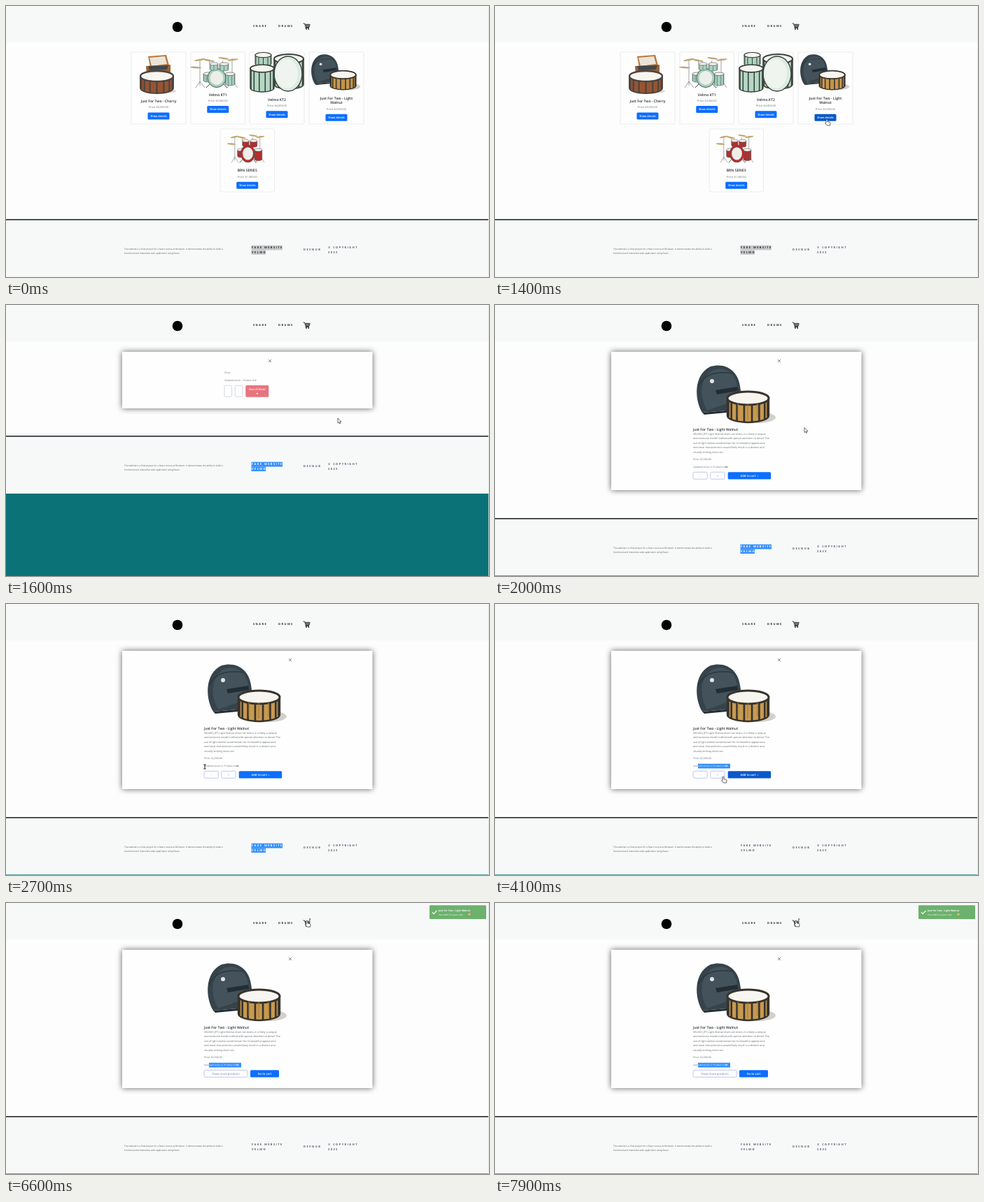
These frames come from a looping animation (690x388 px, 8000 ms). An HTML page:

```html
<!DOCTYPE html>
<html lang="en">
<head>
<meta charset="utf-8">
<title>Drum shop</title>
<style>
  html, body { margin: 0; width: 100%; height: 100%; overflow: hidden; background: #fdfdfd; }
  svg { display: block; width: 100vw; height: 100vh; }
  text { font-family: "Open Sans", "Noto Sans", sans-serif; text-rendering: geometricPrecision; white-space: pre; }
  .panel { fill: #fefefe; filter: drop-shadow(0 0 4px rgba(0, 0, 0, .62)); }
</style>
</head>
<body>
<svg id="stage" viewBox="0 0 690 388" preserveAspectRatio="none"></svg>
<script>
const LOOP = 8000, STEP = 100;
const BLUE = '#0d6efd', BLUE_DARK = '#0a58ca', SELECT = '#3390ff', INK = '#25292d', GREY = '#666b70';
const BRAND = 'Velmo', SERIES = 'Just For Two', ITEM = `${SERIES} - Light Walnut`;

// y is the vertical middle of the capitals
const text = (x, y, size, str, o = {}) =>
  `<text x="${x}" y="${y + size * .36}" font-size="${size}" fill="${o.fill || INK}" font-weight="${o.weight || 400}"
    text-anchor="${o.anchor || 'start'}" letter-spacing="${o.gap || 0}" ${o.attr || ''}>${str}</text>`;
const mid = (x, y, size, str, o = {}) => text(x, y, size, str, { ...o, anchor: 'middle' });
const spaced = (x, y, str, fill = INK) => text(x, y, 4, str, { weight: 700, gap: 1.42, fill });
const rect = (x, y, w, h, fill, attr = '') =>
  `<rect x="${x}" y="${y}" width="${w}" height="${h}" fill="${fill}" ${attr}/>`;
const oval = (x, y, rx, ry, fill, attr = '') =>
  `<ellipse cx="${x}" cy="${y}" rx="${rx}" ry="${ry}" fill="${fill}" ${attr}/>`;
const path = (d, fill, attr = '') => `<path d="${d}" fill="${fill}" ${attr}/>`;
const line = (d, color, w) => path(d, 'none', `stroke="${color}" stroke-width="${w}"`);
const group = (id, body, attr = '') => `<g id="${id}" ${attr}>${body}</g>`;
const button = (x, y, w, h, label, size, id = '') =>
  rect(x, y, w, h, BLUE, `rx="1.5" ${id && `id="${id}"`}`) + mid(x + w / 2, y + h / 2, size, label, { fill: '#fff', weight: 600 });
const outline = (x, y, w, h, label) =>
  rect(x, y, w, h, '#fefefe', 'rx="1.5" stroke="#a4b0ea" stroke-width=".7"') +
  mid(x + w / 2, y + h / 2, 4.1, label, { fill: '#7078c4' });

// Drum seen slightly from above, (x, y) is its top left corner
function drum(x, y, w, h, shell, rim = '#33302d', lugs = 5) {
  const r = w / 2, ry = w * .16, cx = x + r;
  let s = path(`M${x} ${y + ry}V${y + h - ry}A${r} ${ry} 0 0 0 ${x + w} ${y + h - ry}V${y + ry}Z`, shell, `stroke="${rim}" stroke-width="${w * .04}"`);
  for (let i = 0; i < lugs; i++) {
    const a = Math.PI * (i + .5) / lugs;
    const lx = cx - r * .97 * Math.cos(a), ly = y + ry + ry * Math.sin(a);
    s += line(`M${lx} ${ly}V${ly + h - 2 * ry}`, rim, w * .045);
  }
  return s + oval(cx, y + ry, r, ry, '#f6f5f0', `stroke="${rim}" stroke-width="${w * .05}"`);
}

// Case and snare in a 113 x 84 box
const caseAndSnare =
  oval(86, 75, 27, 8, '#d2d0cc') +
  path('M8 68C-3 50-5 14 20 2C40-4 59 7 62 30L65 50L54 64Z', '#36434b') +
  path('M15 65C4 46 3 19 24 7C41 1 55 11 58 31L60 49Z', '#43525b') +
  line('M2 31C10 14 25 8 52 12', '#28343b', 1.2) +
  path('M27 36L58 31L59 37L29 42Z', '#222d34') +
  path('M8 68L54 64L54 67L11 71Z', '#242e34') +
  oval(22, 23, 3, 3, '#dfe4e6') +
  drum(44, 38, 59, 44, '#c79a50', '#38332c', 8) +
  line('M59 54V75M73 56V78M87 54V75', '#a67732', 1);

const boxAndSnare =
  oval(226, 122, 17, 3, '#dddad5') +
  path('M203 72L229 70L233 85L206 88Z', '#b8793d') +
  path('M205 74L227 72L230 83L208 86Z', '#e9e4d9') +
  path('M200 86L235 84V98L201 100Z', '#9b6232') +
  path('M203 86L232 85L230 91L205 92Z', '#43464a') +
  drum(192, 93, 47, 32, '#965532', '#4c4340', 7);

// Kit in a 68 x 48 box
const kit = (shell, cymbal) =>
  line('M10 6V44M10 38L4 47M10 38L17 47M56 5V43M56 36L49 47M56 36L64 47M23 8L28 29M43 8L38 29', '#77797b', .7) +
  [[10, 7, -.5], [23, 8, .5], [44, 5, .4], [57, 7, -.4], [4, 18, .2]].map(([x, y, k]) =>
    oval(x, y, 8, 1.3, cymbal, `transform="rotate(${k * 20} ${x} ${y})"`)).join('') +
  drum(15, 25, 13, 14, shell, '#555', 4) + drum(46, 25, 14, 19, shell, '#555', 4) +
  oval(34, 33, 13, 13.5, shell, 'stroke="#555" stroke-width="1"') +
  oval(34, 33, 9.5, 10, '#eeeee9') +
  drum(24, 11, 12, 11, shell, '#555', 3) + drum(38, 11, 13, 12, shell, '#555', 3) +
  line('M24 42L19 47M44 42L49 47', '#444', 1);

const shells =
  drum(383, 69, 42, 50, '#b9d8c4', '#3c4441', 6) +
  oval(403, 97, 20, 25, '#dcece2', 'stroke="#39413e" stroke-width="1.4"') +
  oval(401, 97, 16, 21, '#eff4ef') +
  drum(356, 66.5, 23, 20, '#aed3bd', '#363d3a', 5) +
  drum(349, 84, 34, 39, '#b4d8c2', '#363d3a', 6);

function card(x, y, w, h, photo, title, titleY, price, btnY) {
  const cx = x + w / 2;
  const rows = [].concat(title);
  return rect(x, y, w, h, '#fefefe', 'rx="2" stroke="#e6e7e8" stroke-width=".8"') + photo +
    rows.map((row, i) => mid(cx, titleY + i * 6.5, 5.1, row, { weight: 600 })).join('') +
    mid(cx, btnY - 7.5, 3.8, `Price: ${price}`, { fill: GREY }) +
    button(cx - 15.5, btnY, 31, 10, 'Show details', 3.9, y === 66 && x === 433 ? 'details' : '');
}

const home =
  card(179, 66, 78, 103, boxAndSnare, `${SERIES} - Cherry`, 136.5, '$3,500.00', 152.5) +
  card(264, 66, 77.5, 103, `<g transform="translate(267 70)">${kit('#a5d2c0', '#bda777')}</g>`, `${BRAND} KT1`, 127, '$3,000.00', 143) +
  card(348, 66, 78, 103, shells, `${BRAND} KT2`, 134.5, '$4,000.00', 150.3) +
  card(433, 66, 78, 103, `<g transform="translate(436 69) scale(.62)">${caseAndSnare}</g>`, [`${SERIES} - Light`, 'Walnut'], 132, '$2,500.00', 154.8) +
  card(306, 176, 77.5, 90, `<g transform="translate(319 181) scale(.78 .92)">${kit('#bb2c2c', '#c2a568')}</g>`, 'BRN SERIES', 235.5, '$1,900.00', 251.8);

const header = rect(0, 0, 690, 52.5, '#f7f9f9') +
  oval(245, 30, 7.3, 7.3, '#000') +
  spaced(353, 29, 'SNARE') + spaced(389, 29, 'DRUMS') +
  line('M424.5 25H426.5L428.3 30.5H433L434.2 26.3H427M428.3 30.5L427.8 31.6H433', '#222', .9) +
  line('M427.5 27.8H433.8M427.9 29.1H433.4M429.3 26.5V30M431.7 26.5V30', '#222', .7) +
  oval(429, 33, .9, .9, '#222') + oval(432.3, 33, .9, .9, '#222') +
  group('badge', text(432.8, 23, 4.2, '2', { weight: 700 }));

const footer = rect(0, 305, 690, 83, '#f7f9f9') + rect(0, 305, 689, 1.7, '#303438') +
  text(169, 348.2, 3.15, 'The website is a final project for a React course at Brixlearn. It demonstrates the ability to build a', { fill: '#4d5256' }) +
  text(169, 354.2, 3.15, 'functional and interactive web application using React.', { fill: '#4d5256' }) +
  group('mark', rect(350.5, 342.7, 44.5, 6.8, 'inherit') + rect(350.5, 349.5, 20.5, 6.5, 'inherit')) +
  group('site', spaced(351, 345.9, 'FAKE WEBSITE', 'inherit') + spaced(351, 352.4, BRAND.toUpperCase(), 'inherit')) +
  spaced(425, 348.8, 'DEVNUB', '#565a6c') +
  spaced(460, 345.9, '© COPYRIGHT', '#565a6c') + spaced(460, 352.4, '2023', '#565a6c');

const cross = (x, y) => line(`M${x - 2} ${y - 2}l4 4m0-4l-4 4`, '#555', .7);

const loading = rect(166, 67, 357.5, 81, '#fefefe', 'class="panel"') + cross(377, 80) +
  text(312, 97, 3.5, 'Price:', { fill: GREY }) +
  text(312, 108, 3.4, 'Updated stock: . Product id #', { fill: GREY }) +
  rect(312, 115.3, 10.5, 16, '#fefefe', 'rx="1.5" stroke="#c3c9dd" stroke-width=".7"') +
  rect(327.3, 115.3, 10.5, 16, '#fefefe', 'rx="1.5" stroke="#c3c9dd" stroke-width=".7"') +
  mid(332.5, 123.5, 3.5, '-', { fill: '#99a' }) +
  rect(342.3, 115, 33, 16.8, '#e8747d', 'rx="1.5"') +
  mid(358.8, 120.6, 4, 'Out of Stock', { fill: '#fff', weight: 600 }) + oval(358.8, 127, 1, 1, '#fff');

const about = [
  'VELMO (JFT) Light Walnut drum set exists, it is likely a unique',
  'and exclusive model crafted with special attention to detail. The',
  'use of light walnut wood known for its beautiful appearance',
  'and tonal characteristics would likely result in a distinct and',
  'visually striking drum set.'
];
const stock = (fill, attr) =>
  text(283, 232.1, 3.4, 'Updated stock: 4. Product id <tspan font-weight="700">#4</tspan>', { fill, attr });

const detail = rect(166, 67, 357.5, 198, '#fefefe', 'class="panel"') + cross(406, 80) +
  `<g transform="translate(288 86)">${caseAndSnare}</g>` +
  text(283, 177.7, 5, ITEM, { weight: 600 }) +
  about.map((row, i) => text(283, 184.2 + i * 6.6, 3.7, row, { fill: GREY })).join('') +
  text(283, 221, 3.5, 'Price: $2,500.00', { fill: GREY }) +
  stock(GREY) + rect(290, 228.7, 0, 6.7, SELECT, 'id="select"') + stock('#fff', 'clip-path="url(#selected)"') +
  group('buy', outline(283, 239.3, 20.3, 10, '-') + outline(307.8, 239.3, 20.3, 10, '+') +
    button(332.7, 239.2, 61.5, 10.2, 'Add to cart  ›', 4.2, 'add')) +
  group('done', outline(283, 239.3, 62, 10, 'Show more products') +
    button(349, 239.2, 41, 10.2, 'Go to cart', 4.2, 'go'));

const toast = rect(605, 3.3, 81, 19.7, '#51a351', 'rx="1.2"') +
  line('M608.8 13.2l2.3 2.4l4.4-4.8', '#fff', 1.2) +
  text(618, 10.3, 3.4, ITEM, { fill: '#fff', weight: 700 }) +
  text(618, 16.3, 3.4, 'You add 2 in your cart.', { fill: '#fff' }) +
  path('M660 18l1.4-4l2.8 2.8Z', '#f2b04a') + oval(663.6, 14.3, .7, .7, '#dd5b60');

const pointers =
  path('M0 0V7.2L1.7 5.7L2.7 8L3.9 7.5L2.9 5.2H5Z', '#fff', 'id="arrow" stroke="#333" stroke-width=".7"') +
  group('beam', line('M-1.7-3H1.7M0-3V3M-1.7 3H1.7', '#222', 1)) +
  path('M0 0Q1 0 1 1V3.7L4.3 4.4Q5.3 4.8 5 6L4.5 9H.4L-2.2 5.9Q-2.5 4.8-1 5.2V1Q-1 0 0 0Z', '#fff', 'id="hand" stroke="#222" stroke-width=".7"');

const stage = document.getElementById('stage');
stage.innerHTML =
  '<defs><clipPath id="selected"><rect id="clip" x="290" y="228" width="0" height="8"/></clipPath></defs>' +
  rect(0, 0, 690, 388, '#fdfdfd') + header + group('home', home) +
  rect(0, 269.7, 690, 119, '#0b7377', 'id="teal"') + group('footer', footer) +
  group('loading', loading) + group('detail', detail) +
  rect(0, 387.2, 690, .8, '#3b8d91', 'id="edge"') + rect(689.2, 0, .8, 388, '#dfe2e3') +
  group('toast', toast) + group('cursor', pointers) +
  rect(0, 0, 690, 388, '#000', 'id="black"');

const el = {};
stage.querySelectorAll('[id]').forEach(node => el[node.id] = node);
const show = (id, on) => el[id].setAttribute('display', on ? 'inline' : 'none');
const set = (id, name, value) => el[id].setAttribute(name, value);

// time, x, y
const route = [
  [1400, 474, 162], [1800, 474, 162], [2300, 383, 200], [2650, 284, 233], [2700, 284, 233],
  [2800, 290, 233], [3100, 337, 233], [3200, 350, 237], [3600, 350, 237], [3900, 360, 246],
  [4100, 326, 247], [4500, 323, 245], [4900, 378, 244], [5200, 376, 241], [5400, 376, 241],
  [5900, 430, 26], [6200, 430, 26], [6800, 430, 25]
];

function along(t) {
  const i = route.findIndex(p => p[0] > t);
  if (i < 0) return route[route.length - 1].slice(1);
  if (i === 0) return route[0].slice(1);
  const [a, b] = [route[i - 1], route[i]];
  const k = (t - a[0]) / (b[0] - a[0]), e = k * k * (3 - 2 * k);
  return [a[1] + (b[1] - a[1]) * e, a[2] + (b[2] - a[2]) * e];
}

const between = (t, from, to) => t >= from && t < to;
const clamp = v => Math.max(0, Math.min(1, v));

function render(t) {
  const atHome = t < 1500, waiting = between(t, 1500, 1700), bought = t >= 5200;
  show('home', atHome);
  show('black', between(t, 1500, 1600));
  show('loading', waiting);
  show('teal', waiting);
  show('detail', t >= 1700);
  show('edge', t >= 1700);
  set('footer', 'transform', `translate(0 ${waiting ? -118 : 0})`);
  set('details', 'fill', t >= 1400 ? BLUE_DARK : BLUE);

  show('mark', t < 2800);
  set('mark', 'fill', atHome ? '#c6c8c9' : SELECT);
  set('site', 'fill', atHome ? INK : t < 2800 ? '#fff' : '#565a6c');

  const width = 46 * clamp((t - 2800) / 300);
  set('select', 'width', width);
  set('clip', 'width', width);

  show('buy', !bought);
  show('done', bought);
  show('badge', bought);
  set('add', 'fill', between(t, 3800, 4200) || t >= 4700 ? BLUE_DARK : BLUE);
  set('go', 'fill', t < 5600 ? BLUE_DARK : BLUE);

  show('toast', bought);
  set('toast', 'opacity', .83 * (.5 - Math.cos(Math.PI * clamp((t - 5170) / 300)) / 2));

  const [x, y] = along(t);
  const beam = between(t, 2200, 3200);
  const hand = atHome || between(t, 3800, 5600) || t >= 5800;
  show('cursor', t >= 1400);
  set('cursor', 'transform', `translate(${x} ${y})`);
  show('beam', beam);
  show('hand', hand);
  show('arrow', !beam && !hand);
}

const start = performance.now();
function tick(now) {
  const t = Math.max(0, now - start) % LOOP;
  render(Math.floor(t / STEP) * STEP);
  requestAnimationFrame(tick);
}
render(0);
requestAnimationFrame(tick);
</script>
</body>
</html>
```
